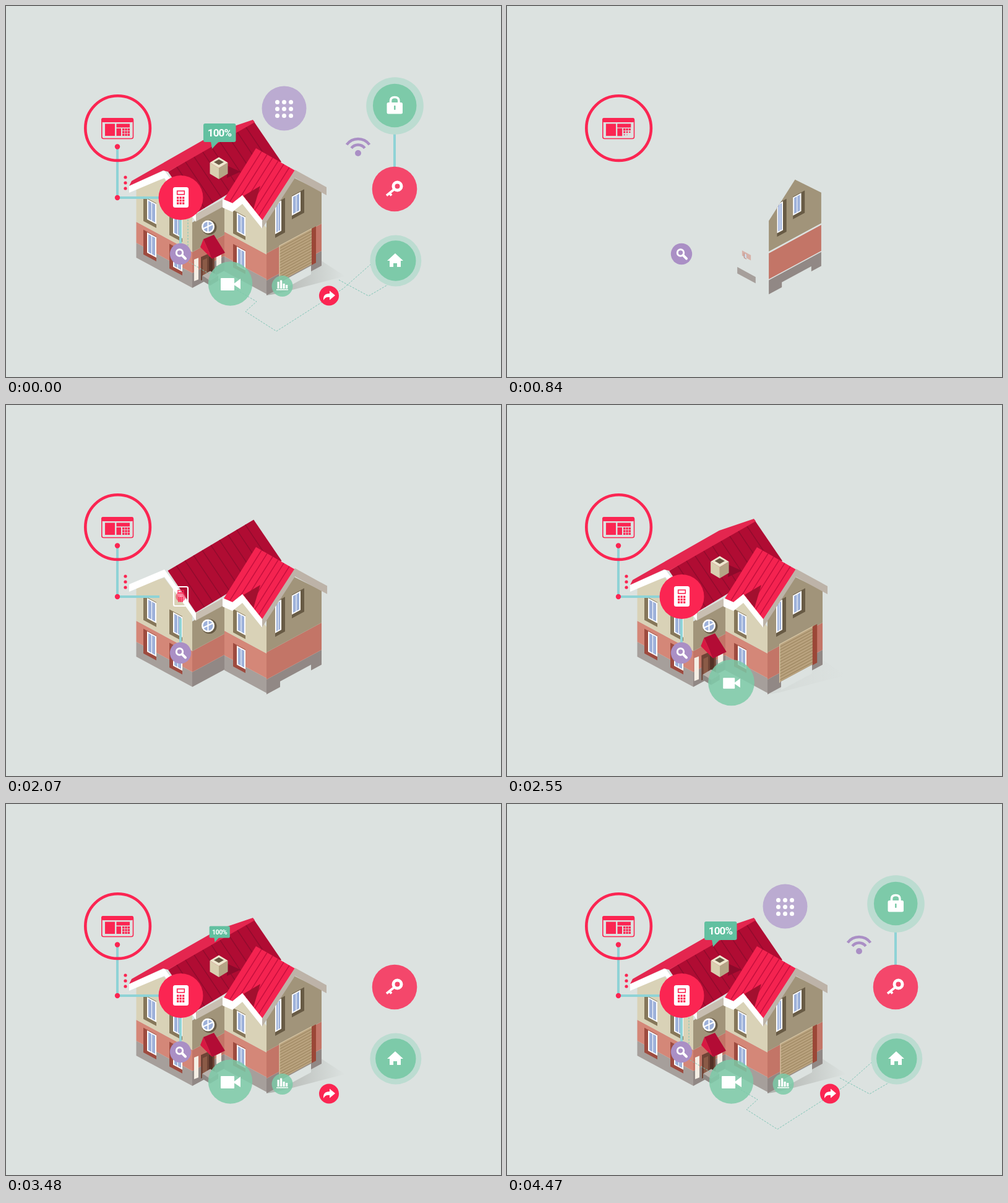
Animation, 800 px wide and 600 px high, one loop 7.47 s. Source, as an HTML page:

```html
<!DOCTYPE html>
<html lang="en">
<head>
<meta charset="utf-8">
<title>Smart house</title>
<style>
html, body { margin: 0; width: 100%; height: 100%; overflow: hidden; background: #dce2e0; }
svg { display: block; width: 800px; height: 600px; }
.pop { transform-box: fill-box; transform-origin: center; }
text { font: 700 17px Roboto, Arial, sans-serif; font-stretch: condensed; letter-spacing: -.8px; }
</style>
</head>
<body>
<svg id="stage" viewBox="0 0 800 600" xmlns="http://www.w3.org/2000/svg">
  <defs>
    <linearGradient id="ground">
      <stop stop-color="#adb0ac"/>
      <stop offset="1" stop-color="#dce2e0"/>
    </linearGradient>
  </defs>
</svg>
<script>
const LOOP = 7470, STEP = 30, END = 4470, POP = 420;
const SLOPE = .54;
const RED = '#fb2552', PURPLE = '#aa8fc5', GREEN = '#7dcaa9', PALE = '#bcdcd1', BLUE = '#8fd3d6';
const SUNNY = { wall: '#d9d2b7', brick: '#d48778', base: '#a69f9b', recess: '#86775a', brickRecess: '#9e4b3f' };
const SHADY = { wall: '#a1947a', brick: '#c37567', base: '#918885', recess: '#685b45' };
const stage = document.getElementById('stage');
const parts = [];

// Shapes
const shape = (fill, d) => `<path fill="${fill}" d="${d}z"/>`;
const disc = (x, y, r, fill = '#fff') => `<circle cx="${x}" cy="${y}" r="${r}" fill="${fill}"/>`;
const ring = (x, y, r, color, width) =>
  `<circle cx="${x}" cy="${y}" r="${r}" fill="none" stroke="${color}" stroke-width="${width}"/>`;
const rect = (x, y, w, h, fill = '#fff', r = 0, more = '') =>
  `<rect x="${x}" y="${y}" width="${w}" height="${h}" rx="${r}" fill="${fill}" ${more}/>`;
const frame = (x, y, w, h, color, width, r = 0) =>
  rect(x, y, w, h, 'none', r, `stroke="${color}" stroke-width="${width}"`);
const stroke = (d, color, width, more = '') =>
  `<path d="${d}" fill="none" stroke="${color}" stroke-width="${width}" ${more}/>`;
const slant = (x, y, w, h, k, fill) => shape(fill, `M${x} ${y}l${w} ${w * k}v${h}l${-w} ${-w * k}`);
const clipped = (id, d, inner) =>
  `<clipPath id="${id}"><path d="${d}"/></clipPath><g clip-path="url(#${id})">${inner}</g>`;

// A polyline given a vertical thickness.
function band(fill, h, ...pts) {
  const low = pts.map(([x, y]) => [x, y + h]).reverse();
  return shape(fill, 'M' + [...pts, ...low].join('L'));
}

// Box seen from above, with its nearest top corner at x, y.
function box(x, y, w, h, top, left, right) {
  const d = w * .6;
  return slant(x - w, y - d, w, h, .6, left) + slant(x, y, w, h, -.6, right)
    + shape(top, `M${x} ${y}l${-w} ${-d}l${w} ${-d}l${w} ${d}`);
}

const grid = (x, y, gap, cell) =>
  Array.from({ length: 9 }, (_, i) => cell(x + i % 3 * gap, y + Math.floor(i / 3) * gap, i));

// Timeline
function add(start, kind, length, markup) {
  const el = document.createElementNS(stage.namespaceURI, 'g');
  el.setAttribute('class', kind);
  el.innerHTML = markup.join('');
  stage.append(el);
  parts.push({ el, start, kind, length });
}
const pop = (start, ...markup) => add(start, 'pop', POP, markup);
const fade = (start, length, ...markup) => add(start, 'fade', length, markup);
const draw = (start, length, d) =>
  add(start, 'draw', length, [stroke(d, BLUE, 4, 'pathLength="1" stroke-dasharray="1 2"')]);

// Recess, white frame and two glass panes; k is the slope of the wall.
function windowAt(x, y, k, recess, w = 14, h = 31) {
  const side = k > 0 ? -6 : 0;
  const pane = (w - 5) / 2;
  return slant(x + side, y + side * k - 1, w + 6, h + 7, k, recess)
    + slant(x, y, w, h, k, '#fff')
    + [2, 3 + pane].map(dx => slant(x + dx, y + dx * k + 2, pane, h - 4, k, '#9db1da')).join('');
}

// Plinth, bricks and plaster stacked up from a bottom corner; gable is the height of the peak.
function wall(x, bottom, w, k, tone, brickHeight, height, gable, starts, windows = ['', '']) {
  const base = bottom - 24, brick = base - brickHeight, top = brick - height;
  pop(starts[0], slant(x, base, w, 24, k, tone.base));
  pop(starts[1], slant(x, brick, w, brickHeight, k, tone.brick), windows[0]);
  const outline = `M${x} ${brick}V${top}l${w / 2} ${w * k / 2 - gable}L${x + w} ${top + w * k}V${brick + w * k}z`;
  pop(starts[2], shape(tone.wall, outline), clipped('wall' + x, outline, windows[1]));
}

function roof(id, d, fill, line, x, y, step, drop, count) {
  let seams = '';
  for (let i = 1; i <= count; i++) seams += `M${x + i * step} ${y + i * step * drop[2]}l${drop[0]} ${drop[1]}`;
  return shape(fill, d) + clipped(id, d + 'z', stroke(seams, line, 1.5));
}

// Ground and walls
fade(2500, 300, shape('url(#ground)', 'M421 468L508 411L548 437L440 465'));
wall(421, 468, 89, -SLOPE, SHADY, 44, 52, 46, [680, 680, 680],
  ['', windowAt(462, 308, -SLOPE, SHADY.recess) + windowAt(435, 320, -SLOPE, SHADY.recess, 10, 49)]);
pop(680, slant(443, 447, 50, 14, -SLOPE, '#dce2e0'));
wall(353, 429, 68, SLOPE, SUNNY, 40, 43, 23, [790, 818, 1325],
  [389, 334].map((y, i) => windowAt(373, y, SLOPE, i ? SUNNY.recess : SUNNY.brickRecess)));
wall(301, 456, 52, -SLOPE, SHADY, 34, 48, 0, [930, 990, 1050]);
pop(1080, disc(328.5, 358, 12, SHADY.recess), disc(326.5, 357, 10.5), disc(326.5, 357, 8, '#9db1da'),
  stroke('M326.5 348v18M319 360l15-7', '#fff', 2));
wall(210.5, 407, 90.5, SLOPE, SUNNY, 34, 58, 36, [1060, 1332, 1387],
  [366, 312].map((y, i) => [0, 42].map(dx =>
    windowAt(228 + dx, y + dx * SLOPE, SLOPE, i ? SUNNY.recess : SUNNY.brickRecess, 15, 33)).join('')));

// Garage
let slats = '';
for (let y = 392; y < 446; y += 4.6) slats += `M442 ${y}l52-28`;
pop(2250, slant(442, 388, 52, 58, -SLOPE, '#b9a27e'), stroke(slats, '#9d8660', 1.1),
  stroke('M442 447V388L494 360', '#d6c5a3', 1.3));
pop(2270, slant(494, 360, 7, 59, -SLOPE, '#9b4737'));

// Entrance
pop(2280, slant(304, 410, 7, 35, -.4, '#f4eee4'), slant(315, 406, 22, 38, -.45, '#6f4436'),
  slant(318, 411, 7, 27, -.45, '#8b5b47'), slant(328, 406, 6, 27, -.45, '#523026'),
  slant(340, 406, 8, 15, -.5, '#f4eee4'));
pop(2310, box(330, 444, 13, 8, '#b9b3ad', '#8e8884', '#9f9994'));
pop(2340, shape('#b30c35', 'M319 377L336 370L354 399L333 409'), shape('#d91842', 'M319 377L314 390L333 409'));

// Roofs
pop(1680, roof('mainRoof', 'M262 268L400 186L445 252L307 335', '#b00c33', '#920b2d',
  262, 268, 13.8, [45, 67, -.6], 9));
pop(1650, band('#c8beb1', 12, [306, 337], [350, 313]));
pop(1670, roof('sideRoof', 'M404 230L467 266L414 347L382 306L366 319L352 313', '#f42350', '#c60f3d',
  404, 230, 9, [-51, 81, .57], 6), shape('#a3102f', 'M411 291L400 328L384 307'));
pop(1710, band('#bdb3a8', 13, [414, 347], [467, 265], [518, 293]));
pop(1640, band('#fff', 14, [350, 312], [366, 319], [382, 306], [414, 346]));
pop(1640, band('#fff', 12, [199, 290], [256, 266], [307, 337]));
pop(2110, shape('#e4264f', 'M199 291L203 283L343 203L399 184L402 188L262 268L254 266'));
pop(2180, shape('#8d0a2b', 'M357 258L379 268L357 278'),
  box(344, 262, 14.5, 18, '#efe8cf', '#d9cfb0', '#b4a485'),
  shape('#6b5a46', 'M344 257l-8-4.5l8-4.5l8 4.5'));

// Connections
fade(4110, 330, stroke('M294 345V413L405 478L387 494L437 526L545 457L597 411M538 443L586 469L632 442',
  '#7fc5b6', 1, 'stroke-dasharray="3 2"'));
draw(950, 350, 'M180 228V310H248');
draw(1200, 200, 'M282 345V384');
draw(4080, 180, 'M628 196V260');

// Control panel
pop(330, ring(180.6, 197.6, 52.3, RED, 4.6));
pop(400, frame(154.8, 181.8, 50.7, 32.7, RED, 1.6, 3), rect(154, 181, 52, 7, RED, 3));
pop(450, rect(160, 190.5, 16, 19.5, RED));
pop(490, rect(178.5, 190.5, 21.5, 6, RED));
pop(530, rect(178.5, 198, 7.5, 12, RED));
grid(188, 198, 4.3, (x, y, i) => pop(640 + i * 23, rect(x, y, 3.4, 3.4, RED)));
pop(900, disc(180, 227.5, 4.2, RED));
pop(1020, disc(180, 310, 4.2, RED));
for (let i = 0; i < 3; i++) pop(1050 + i * 40, disc(193, 277 + i * 9, 2.6, RED));

// Search
pop(400, disc(282, 401, 17.2, PURPLE));
pop(440, ring(280.5, 399, 5.2, '#fff', 3), stroke('M284.5 403l5.5 5.5', '#fff', 4, 'stroke-linecap="round"'));

// Calculator
pop(2046, disc(282.5, 310, 36, RED));
pop(1440, frame(271, 294, 23, 31, '#fff', 2.2, 2.5));
pop(2060, rect(271, 294, 23, 31));
pop(1960, frame(276.7, 299.2, 11.6, 5.6, RED, 1.6));
pop(1990, grid(276, 308.5, 4.5, (x, y) => rect(x, y, 3.3, 3.3, RED)).join(''));

// Camera, chart and share
pop(2330, `<g opacity=".85">${disc(362.5, 449, 35.7, GREEN)}</g>`);
pop(2420, rect(347, 440, 22, 20, '#fff', 1), shape('#fff', 'M367 450L379 441V458'));
pop(2600, `<g opacity=".85">${disc(446.5, 453, 17, GREEN)}</g>`);
pop(2640, [11, 13.5, 8, 6].map((h, i) => rect(438.5 + i * 4.5, 457 - h, 3.2, h)).join(''),
  rect(437, 458, 19, 1.5));
pop(2650, disc(522, 468.5, 16, RED));
pop(2700, shape('#fff', 'M513 476q-1-11 10-11v-4.500l9 7.500-9 7.500v-4.500q-7-1-10 5'));

// Home
pop(2640, disc(629.8, 412, 41.5, PALE));
pop(2923, disc(629.8, 412, 32.7, GREEN));
pop(2740, shape('#fff', 'M629 400l13 12h-4v10h-6v-6h-6v6h-6v-10h-4'));

// Key
pop(2978, disc(628, 296, 36.3, '#f4476b'));
pop(2860, ring(632.5, 291.5, 6.5, '#fff', 5), stroke('M628 296l-13 10.5M620 303l3 3.5', '#fff', 3.8));

// Battery tag
pop(3400, rect(319, 190, 52.5, 30, '#62c0a0', 3), shape('#62c0a0', 'M331 219h13l-11 12'),
  '<text x="345" y="211" text-anchor="middle" fill="#fff">100%</text>');

// Keypad
pop(3805, disc(449.5, 165.5, 36, '#bbabd1'));
grid(438.5, 155.5, 11, (x, y, i) => pop(3480 + i * 12, disc(x, y, 3.5)));

// Wireless signal
const wave = r => stroke(`M${569 - r * .8} ${238 - r * .6}a${r} ${r} 0 0 1 ${r * 1.6} 0`, PURPLE, 4.4);
pop(3680, disc(569, 238, 5, PURPLE));
pop(3805, wave(23), wave(13.5));

// Lock
pop(4000, disc(628.5, 161.5, 46.3, PALE));
pop(3908, disc(628.2, 161, 35.3, GREEN));
pop(3886, rect(615.5, 156, 25.5, 18.5, '#fff', 2.5),
  stroke('M621.5 158v-4.500q0-6 6.700-6t6.700 6v4.500', '#fff', 3.6), rect(627, 161, 2.6, 7, GREEN, 1));

const easeOutBack = p => 1 + 2.3 * (p - 1) ** 3 + 1.3 * (p - 1) ** 2;

function render(now) {
  const time = Math.floor(now % LOOP / STEP) * STEP;
  const scene = time < STEP ? END : time;
  for (const { el, start, kind, length } of parts) {
    const p = Math.min(1, Math.max(0, (scene - start) / length));
    el.style.visibility = p > 0 ? 'visible' : 'hidden';
    if (kind === 'draw') {
      el.firstChild.style.strokeDashoffset = 1 - p;
    } else if (kind === 'fade') {
      el.style.opacity = p;
    } else {
      el.style.transform = p < 1 ? `scale(${Math.max(0, easeOutBack(p))})` : '';
      el.style.opacity = Math.min(1, p / .1);
    }
  }
}

const begin = performance.now();
function tick() {
  render(performance.now() - begin);
  requestAnimationFrame(tick);
}
render(0);
requestAnimationFrame(tick);
</script>
</body>
</html>
```
